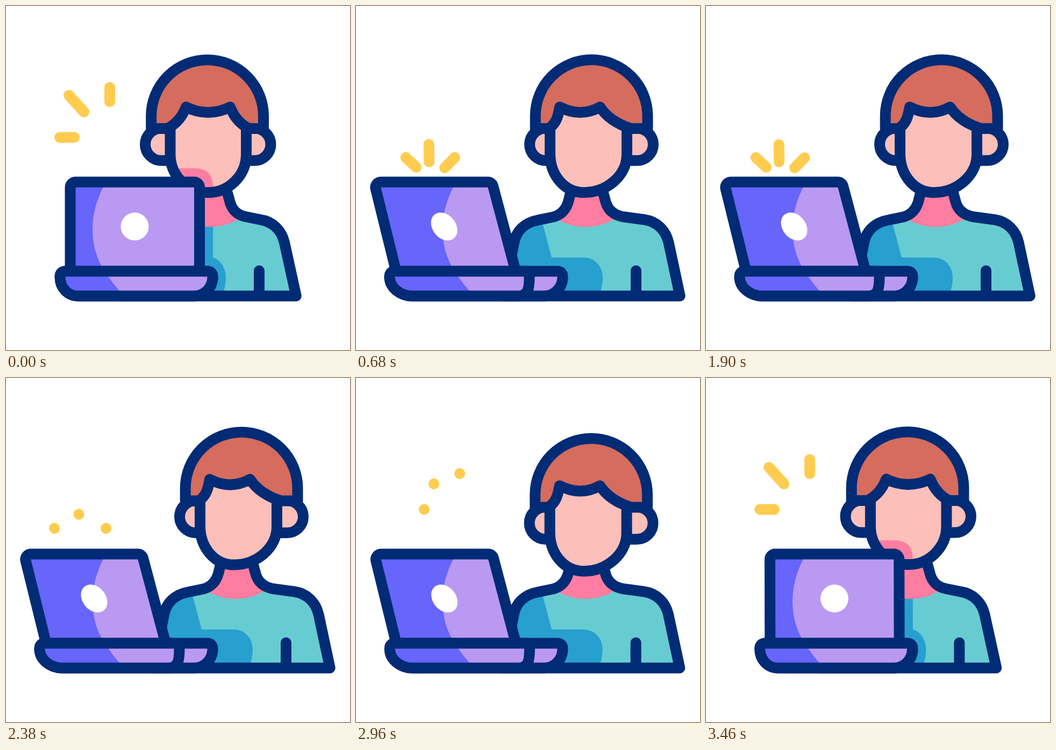
An HTML page with a canvas that plays this animation: 640x640 px, repeating every 3.6 s.

```html
<!DOCTYPE html>
<html lang="en">
<head>
<meta charset="utf-8">
<title>Laptop worker</title>
<style>
html, body { margin: 0; width: 100%; height: 100%; overflow: hidden; background: #fff; }
canvas { display: block; width: 640px; height: 640px; }
</style>
</head>
<body>
<canvas id="stage" width="640" height="640"></canvas>
<script>
const ctx = document.getElementById('stage').getContext('2d');
const NAVY = '#022b75', SKIN = '#fdbfb9', HAIR = '#d56c5d', PINK = '#ff7da0',
  TEAL = '#67ccd1', BLUE = '#279fcf', LILAC = '#ba99f2', INDIGO = '#6765fa', YELLOW = '#ffcc50';
const LOOP = 3600, STEP = 20, LAST = 3460;
const CLOSE_START = 2930, CLOSE_END = 3490;

// Rays as [inner x, inner y, outer x, outer y]
const AIR_RAYS = [[145, 197, 117, 166], [193, 178, 193, 151.5], [127, 244.5, 100, 244.5]];
const LID_RAYS = [[112, 300, 90, 279.5], [136, 290, 135.5, 253.5], [165, 301, 186, 279.5]];

const ease = (t, from, to) => {
  const f = Math.min(1, Math.max(0, (t - from) / (to - from)));
  return (1 - Math.cos(Math.PI * f)) / 2;
};

// Template tag: numbers as they are, [start, shift] pairs move with the pose.
const pathFor = q => (parts, ...vals) => new Path2D(parts.reduce((s, part, i) => {
  const v = vals[i - 1];
  return s + (Array.isArray(v) ? v[0] + v[1] * q : v) + part;
}));

function fill(path, color) {
  ctx.fillStyle = color;
  ctx.fill(path);
}

function stroke(path, color = NAVY) {
  ctx.strokeStyle = color;
  ctx.lineWidth = 20;
  ctx.stroke(path);
}

function clipped(path, draw) {
  ctx.save();
  ctx.clip(path);
  draw();
  ctx.restore();
}

function shadowPath(q) {
  return pathFor(q)`M0 302 H${[351, -64]} Q${[385, -64]} 302 ${[385, -56]} 336
    L${[385, -21]} 468 H${[385, 39]}
    C${[399, 45]} ${[472, -4]} ${[409, 50]} ${[487, -3]} ${[409, 50]} 505
    Q${[409, 50]} 520 ${[404, 50]} 534 H0 Z`;
}

function drawBody(q, shadow) {
  const path = pathFor(q);
  const body = path`M${[351, 48]} 348 L${[347, 48]} 364
    C${[342, 48]} 381 ${[332, 48]} 389 ${[312, 55]} 392.5 L${[277, 63]} 398
    C${[249, 63]} 403 ${[235, 63]} 420 ${[231, 63]} 440 L${[211, 63]} 539.5
    H${[539.8, 63]} L${[518, 63.6]} 440
    C${[513, 63.6]} 418 ${[497, 63.6]} 401 ${[473, 63.6]} 397.5 L${[446, 50]} 392
    C${[432, 50]} 389 ${[422, 48]} 382 ${[417, 48]} 366 L${[412, 48]} 348`;
  fill(body, TEAL);
  clipped(body, () => {
    fill(shadow, BLUE);
    const collar = new Path2D();
    collar.ellipse(379 + 48 * q, 360, 76, 51, 0, 0, 7);
    fill(collar, PINK);
  });
  stroke(body);
  stroke(path`M${[471, 50]} 492.5 V539`);
}

function drawHead(q, dip, shadow) {
  const path = pathFor(q);
  const ears = path`M${[305.5, 55.5]} 227.5 H${[289, 64]}
    a30 30 0 0 0 0 60 H${[305.5, 55.5]}
    M${[447, 57]} 227.5 H${[462.5, 60.5]} a30 30 0 0 1 0 60 H${[447, 57]}`;
  const face = path`M${[305.5, 55.5]} 227 V276
    C${[305.5, 56]} 315 ${[337, 51]} 347 ${[376, 48]} 347
    C${[415, 52]} 347 ${[447, 57]} 315 ${[447, 57]} 276 V227`;
  const forehead = path`M${[305.5, 55.5]} 170 H${[447, 57]} V230 H${[305.5, 55.5]} Z`;
  const hair = path`M${[270.2, 63.5]} 228 V204.5
    A104.4 104.4 0 0 1 ${[479, 63.5]} 204.5 V228 H${[452, 60]}
    C${[436, 50]} 220 ${[424, 42]} 206 ${[417, 37]} 188
    Q${[376, 42]} 208 ${[335, 44]} 188
    C${[328, 48]} 206 ${[316, 56]} 220 ${[300, 58]} 228 Z`;

  ctx.save();
  ctx.translate(0, dip);
  fill(ears, SKIN);
  stroke(ears);
  fill(forehead, SKIN);
  fill(face, SKIN);
  clipped(face, () => {
    ctx.translate(0, -dip);
    fill(shadow, PINK);
  });
  stroke(face);
  fill(hair, HAIR);
  stroke(hair);
  ctx.restore();
}

function basePath(q, endShift, footShift) {
  const end = x => [x, endShift], foot = x => [x, footShift];
  return pathFor(q)`M${[111, -38]} 493.5 H${end(374)}
    Q${end(384.5)} 493.5 ${end(384.5)} 504
    C${end(384.5)} 524 ${foot(369)} 539.5 ${foot(350)} 539.5 H${[134, -30]}
    C${[115, -32]} 539.5 ${[100.5, -38]} 524 ${[100.5, -38]} 504
    Q${[100.5, -38]} 493.5 ${[111, -38]} 493.5 Z`;
}

function drawLaptop(q) {
  const shade = new Path2D('M181 337 C153 390 153 455 190 503 Q200 518 211 530 L216 545 H0 V320 H190 Z');
  const panel = (path) => {
    fill(path, LILAC);
    clipped(path, () => fill(shade, INDIGO));
    stroke(path);
  };
  const lid = new Path2D();
  const left = 119.5 - 86 * q, right = 360 - 107 * q;
  const footLeft = 119.5 - 45 * q, footRight = 360 - 63 * q;
  lid.moveTo(footLeft, 493.5);
  lid.arcTo(left, 327.5, right, 327.5, 10);
  lid.arcTo(right, 327.5, footRight, 493.5, 10);
  lid.lineTo(footRight, 493.5);
  lid.closePath();

  const rear = basePath(q, 0, 0);
  fill(rear, LILAC);
  stroke(rear);
  panel(lid);
  panel(basePath(q, -62, -48));

  ctx.save();
  ctx.transform(1 - 0.09 * q, 0, 0.255 * q, 1, 239.5 - 75.5 * q, 410.3);
  const badge = new Path2D();
  badge.arc(0, 0, 26, 0, 7);
  fill(badge, '#fff');
  ctx.restore();
}

// Draws the part of each ray between two fractions of its length.
function drawRays(rays, from, to) {
  for (const [x0, y0, x1, y1] of rays) {
    const ray = new Path2D();
    ray.moveTo(x0 + (x1 - x0) * from, y0 + (y1 - y0) * from);
    ray.lineTo(x0 + (x1 - x0) * to + 0.01, y0 + (y1 - y0) * to);
    stroke(ray, YELLOW);
  }
}

function drawSparks(t) {
  if (t < 400) drawRays(AIR_RAYS, ease(t, 0, 400), 1);
  else if (t >= CLOSE_START) drawRays(AIR_RAYS, 0, ease(t, CLOSE_START, CLOSE_END));

  if (t >= 440 && t < 2400) {
    const pulse = t < 1970 ? (1 - Math.cos(Math.PI * (t - 440) / 306)) / 2 : 1;
    drawRays(LID_RAYS, ease(t, 2000, 2400), pulse);
  }
}

function render(now) {
  const t = Math.min(LAST, Math.floor((now % LOOP) / STEP) * STEP);
  const open = ease(t, 0, 560) - ease(t, CLOSE_START, CLOSE_END);
  const dip = 12.5 * (ease(t, 2280, 3000) - ease(t, 3000, CLOSE_END));
  const shadow = shadowPath(open);

  ctx.fillStyle = '#fff';
  ctx.fillRect(0, 0, 640, 640);
  ctx.lineCap = ctx.lineJoin = 'round';
  drawBody(open, shadow);
  drawHead(open, dip, shadow);
  drawLaptop(open);
  drawSparks(t);
}

const start = performance.now();
function tick() {
  render(performance.now() - start);
  requestAnimationFrame(tick);
}
tick();
</script>
</body>
</html>
```
